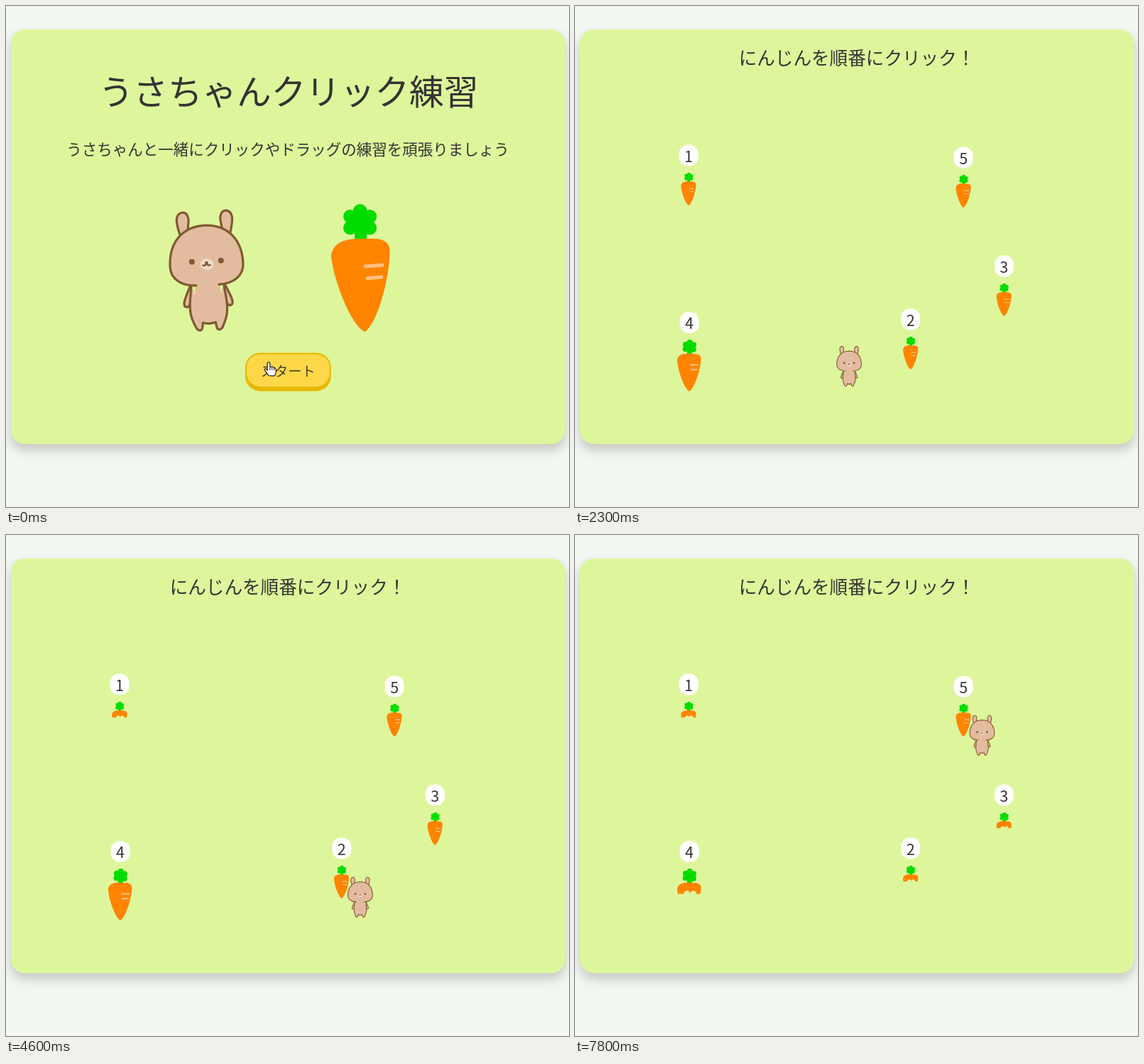
Write an HTML page with a canvas that moves like this. It is 793 by 706 pixels and loops after 8 s.

```html
<!DOCTYPE html>
<html lang="ja">
<head>
<meta charset="utf-8">
<title>クリック練習</title>
<style>
html, body { margin: 0; width: 100%; height: 100%; overflow: hidden; background: #f2f7f1; }
canvas { display: block; }
</style>
</head>
<body>
<canvas id="stage" width="793" height="706"></canvas>
<script>
const ctx = document.getElementById('stage').getContext('2d');
const LOOP = 8000, GAME_START = 1750, COARSE_START = 5000;
const FONT = '"Noto Sans CJK JP", "Noto Sans CJK", sans-serif';
const BROWN = '#7f5a33', FUR = '#e3bc9f', INK = '#333', GREEN = '#00dc00';

const clamp01 = v => Math.max(0, Math.min(1, v));
const smooth = v => v * v * (3 - 2 * v);
const mix = (a, b, k) => a + (b - a) * k;

// Right half given, left half mirrored.
function mirrored(d) {
  const half = new Path2D(d), both = new Path2D(half);
  both.addPath(half, new DOMMatrix([-1, 0, 0, 1, 0, 0]));
  return both;
}

// Shapes stand on the origin: feet of the rabbit, tip of the carrot.
const EARS = mirrored('M24-142C24-150 21-157 23-162C26-172 37-170 39-160C40-152 37-144 35-135');
const HEAD = mirrored('M-1-149C33-149 51.5-126 51.5-93C51.5-76 37-65 16-65');
const ARMS = mirrored('M24-66C27-58 33-48 34-41C35-34 28-33 26-39L22-58');
const BODY = mirrored('M23-63C25-49 27-40 26-28C25-17 21-10 18-4C15 0 11-1 10-5L9-12Q4-10.5-1-10.5');
const MOUTH = mirrored('M0-96Q2-91 5-93');
const ROOT = new Path2D('M-43-108C-41-122-32-129-15-131Q5-132 22-130C35-128 41-122 40-110C37-72 19-14 0 0C-14-4-38-58-43-108Z');
const HAND = new Path2D('M-2 2C-2-1 2-1 2 2V7Q10 6 11 12Q11 16 9 20H0Q-2 17-5 13Q-7 10-5 9.5Q-3 10-2 12Z');

function place(x, y, scale, angle, draw) {
  ctx.save();
  ctx.translate(x, y);
  ctx.rotate(angle);
  ctx.scale(scale, scale);
  draw();
  ctx.restore();
}

function fill(shape, color) {
  ctx.fillStyle = color;
  ctx.fill(shape);
}

function stroke(shape, color, width) {
  ctx.lineCap = ctx.lineJoin = 'round';
  ctx.strokeStyle = color;
  ctx.lineWidth = width;
  ctx.stroke(shape);
}

function disc(x, y, rx, ry, color) {
  const p = new Path2D();
  p.ellipse(x, y, rx, ry, 0, 0, Math.PI * 2);
  fill(p, color);
}

function box(x, y, w, h, r, color) {
  const p = new Path2D();
  p.roundRect(x, y, w, h, r);
  fill(p, color);
}

function text(s, x, midY, size, color = INK) {
  ctx.font = `${size}px ${FONT}`;
  ctx.textAlign = 'center';
  ctx.fillStyle = color;
  ctx.fillText(s, x, midY + size * 0.38);
}

function rabbit(x, y, scale, angle = 0) {
  place(x, y, scale, angle, () => {
    for (const limb of [ARMS, EARS]) {
      fill(limb, FUR);
      stroke(limb, BROWN, 3.2);
    }
    fill(BODY, FUR);
    fill(HEAD, FUR);
    box(-18, -145, 36, 132, 4, FUR);
    stroke(BODY, BROWN, 3.2);
    stroke(HEAD, BROWN, 3.2);
    for (const side of [-1, 1]) disc(20.5 * side, -98.5, 4, 4, BROWN);
    disc(0.5, -94, 9.5, 8, '#f1dac8');
    disc(0, -96.5, 2.4, 1.8, BROWN);
    stroke(MOUTH, BROWN, 2.5);
  });
}

// Everything above a level line, less two round bites.
function bitten() {
  const p = new Path2D(), edge = -92;
  p.moveTo(50, -140);
  p.lineTo(-50, -140);
  p.lineTo(-50, edge);
  for (const x of [-9, 13]) p.arc(x, edge, 11, Math.PI, Math.PI * 2);
  p.lineTo(50, edge);
  return p;
}

function carrot(x, y, scale, angle = 0, eaten = false) {
  place(x, y, scale, angle, () => {
    box(-8.5, -148, 17, 22, 2, GREEN);
    disc(0, -154, 14, 14, GREEN);
    for (let i = 0; i < 5; i++) {
      const a = (i * 60 - 207) * Math.PI / 180;
      disc(16 * Math.cos(a), 16 * Math.sin(a) - 154.5, 9.7, 9.7, GREEN);
    }
    if (eaten) ctx.clip(bitten());
    fill(ROOT, '#ff8400');
    if (eaten) return;
    for (let i = 0; i < 2; i++) {
      stroke(new Path2D(`M${4.5 + 2 * i} ${17 * i - 92}l${24 - 4 * i}-0.8`), '#ffc184', 5);
    }
  });
}

function card() {
  ctx.fillStyle = '#f2f7f1';
  ctx.fillRect(0, 0, 793, 706);
  ctx.save();
  ctx.shadowColor = 'rgba(0,0,0,.2)';
  ctx.shadowBlur = 16;
  ctx.shadowOffsetY = 8;
  box(7, 33, 780.5, 584.5, 20, '#def69b');
  ctx.restore();
}

function button(k) {
  const y = 488.7 + 2 * k;
  box(337, y, 120.8, 54 - 2 * k, 21, '#e6b800');
  box(339, y + 2, 116.8, 45.6, 19, `rgb(255,${mix(216, 221, k)},${mix(74, 100, k)})`);
  text('スタート', 397.3, y + 26.5, 19.2, '#4d4020');
}

function startScreen(t) {
  text('うさちゃんクリック練習', 398, 121, 48.6);
  text('うさちゃんと一緒にクリックやドラッグの練習を頑張りましょう', 397, 202, 21.5);
  const sway = 3.37 * Math.PI / 180 * Math.sin(2 * Math.PI * t / 3000 - 0.955);
  rabbit(287, 458, 1, sway);
  carrot(506, 459, 1, sway);
  button(smooth(clamp01(t / 150)));
  const k = smooth(clamp01(t / 450));
  place(mix(370, 406, k), mix(502, 524, k), 0.95, 0, () => {
    fill(HAND, '#fff');
    stroke(HAND, '#111', 1.2);
    for (const x of [2, 5, 8]) stroke(new Path2D(`M${x} 8v3.5`), '#111', 1);
  });
}

// Tip of each carrot, in order, and when the rabbit comes and when it eats.
const CARROTS = [
  { x: 160.3, y: 281, come: 2900, eat: 3400 },
  { x: 473, y: 512, come: 4500, eat: 4950 },
  { x: 604.6, y: 437, come: 5250, eat: 6150 },
  { x: 161.3, y: 543, come: 6650, eat: 7200, scale: 0.405 },
  { x: 547.4, y: 284, come: 7450, eat: LOOP }
];
const STOPS = [
  { x: 407, y: 562, leave: 2150 },
  ...CARROTS.map((c, i) => ({
    x: c.x + (i ? 26 : 46), y: c.y + (i ? 27 : 35), come: c.come, leave: c.eat
  }))
];

function rabbitAt(t) {
  const i = STOPS.findIndex(s => t < s.leave);
  const to = STOPS[i], from = STOPS[i - 1] || to;
  const k = i ? smooth(clamp01((t - from.leave) / (to.come - from.leave))) : 1;
  return [mix(from.x, to.x, k), mix(from.y, to.y, k)];
}

function gameScreen(t) {
  text('にんじんを順番にクリック！', 397, 73, 25.6);
  CARROTS.forEach(({ x, y, eat, scale = 0.257 }, i) => {
    const badgeY = y - 179 * scale - 24.5;
    box(x - 13.7, badgeY - 15, 27, 30, 12.5, '#fff');
    text(i + 1, x - 0.3, badgeY + 1, 21.5);
    carrot(x, y, scale, 0, t >= eat);
  });
  rabbit(...rabbitAt(t), 0.337);
}

function frame(now) {
  const raw = now % LOOP, step = raw < COARSE_START ? 50 : 200;
  const t = Math.floor(raw / step) * step;
  card();
  (t < GAME_START ? startScreen : gameScreen)(t);
  requestAnimationFrame(frame);
}
requestAnimationFrame(frame);
</script>
</body>
</html>
```
